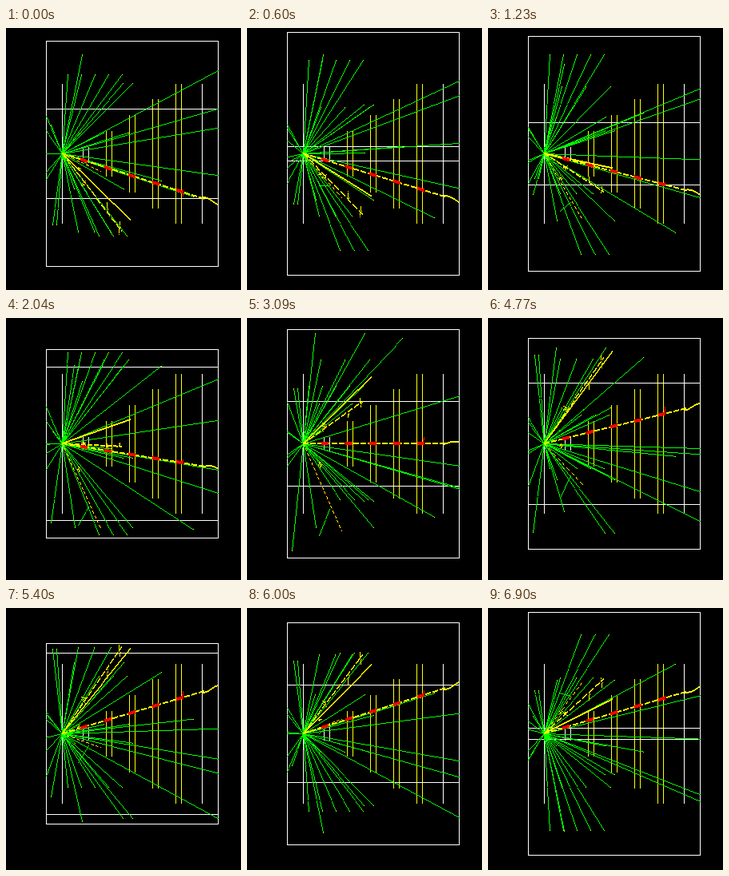
Animation, 294 px wide and 328 px high, one loop 6930 ms. Source, as a matplotlib script:

```python
import numpy as np
import matplotlib.pyplot as plt
from matplotlib.animation import FuncAnimation

W, H, DPI = 294, 328, 100
X0, CY = 70, 157
LEFT, RIGHT, BOX_R = 50, 265, 152
FRAMES, STEP = 231, np.radians(0.963)
HOLD = 12.55  # every so often the turn pauses for one frame
WHITE, GREEN, YELLOW, RED = (255,) * 3, (0, 255, 0), (255, 255, 0), (255, 0, 0)


def polar(r, deg):
    """Position across the beam as a complex number."""
    return r * np.exp(1j * np.radians(deg))


# Sprays of tracks: direction, radius, first x, last x, count
SPRAYS = [(53, 124, 77, 145, 5), (-53, 111, 58, 63, 2), (-64, 109, 90, 131, 3),
          (-125, 126, 116, 151, 3), (128.5, 112, 146, 158, 2),
          (-18, 144, 85, 147, 2), (14, 109, 92, 153, 3), (-166, 109, 86, 158, 2)]
# Single tracks: end x, radius, direction
SINGLES = [(56, 138, 165), (95, 126, 81), (194, 135, -14.5), (234, 107.5, -150),
           (265, 107, 103.5), (265, 83, 42.6), (265, 64.5, 150), (265, 62, -154)]

rng = np.random.default_rng(4)
tracks = [(x, polar(r, deg)) for deg, r, a, b, n in SPRAYS
          for x in np.linspace(a, b, n)]
tracks += [(x, polar(r, deg)) for x, r, deg in SINGLES]
tracks += [(LEFT, polar(rng.uniform(10, 55), deg)) for deg in range(0, 360, 60)]


def ray(x, r, deg):
    return np.array([X0, x]), np.array([0, polar(r, deg)])


def squiggle(x, r, deg, n=6):
    """A short ragged path around one point."""
    noise = rng.normal(0, 1.5, (3, n))
    return x + noise[0], polar(r, deg) * np.linspace(.9, 1.06, n) + noise[1] + 1j * noise[2]


kink = np.array([103, 90]), np.array([polar(84, -170), polar(115, -178)])
jet = ray(155, 116, -45.7)
shower = ray(144, 109, -62.7)
curl = ray(118, 112, -168.7)
muon = ray(248, 57, -91)
tail_x = np.arange(246, 266, 3)
tail = tail_x, polar(62.5, -91) * (tail_x - X0) / 195 + 2 * np.exp(1.9j * tail_x)
scraps = [squiggle(91, 32, -146), squiggle(97, 45, -60), squiggle(127, 76, -63),
          squiggle(141, 107, -62)]
muon_slope = polar(62.5, -91) / 195


def stroke(img, xs, ys, color, width=1, dash=(1, 0)):
    """Hard-edged polyline; dash is (on, off) in pixels."""
    on, off = dash
    for xa, ya, xb, yb in zip(xs[:-1], ys[:-1], xs[1:], ys[1:]):
        n = int(max(abs(xb - xa), abs(yb - ya))) + 1
        keep = np.arange(n) % (on + off) < on
        px = np.rint(np.linspace(xa, xb, n)).astype(int)[keep]
        py = np.rint(np.linspace(ya, yb, n)).astype(int)[keep]
        for k in range(width):
            img[py + k - width // 2, px] = color


# Fixed parts: the detector discs, seen from the side
base = np.zeros((H, W, 3), np.uint8)
for x in (70, 245):
    base[CY - 87:CY + 88, x] = WHITE
for k in range(5):
    r = min(8 + 20 * k, 87)
    for x in (96 + 29 * k, 103 + 29 * k):
        base[CY - r:CY + r + 1, x] = YELLOW if k else WHITE

fig = plt.figure(figsize=(W / DPI, H / DPI), dpi=DPI, facecolor="black")
ax = fig.add_axes([0, 0, 1, 1])
ax.axis("off")
view = ax.imshow(base, interpolation="nearest", aspect="auto")


def draw(i):
    a = (i - int(i / HOLD)) * STEP
    turn = np.exp(1j * a)
    img = base.copy()

    def path(xs, zs, color, **kw):
        stroke(img, xs, CY - (zs * turn).imag, color, **kw)

    corners = polar(BOX_R, 68.3 + 90 * np.arange(4)) * turn
    ys = np.rint(CY - corners.imag).astype(int)
    img[ys, LEFT:RIGHT + 1] = WHITE
    for x in (LEFT, RIGHT):
        img[ys.min():ys.max() + 1, x] = WHITE

    for x, z in tracks:
        path(np.array([X0, x]), np.array([0, z]), GREEN)
        if LEFT < x < RIGHT:
            path(np.array([x, x]), np.array([z, z]), YELLOW)
    path(*kink, GREEN)

    path(*curl, YELLOW, dash=(4, 2))
    path(*curl, RED, dash=(1, 8))
    path(*jet, YELLOW, width=2)
    path(*shower, YELLOW, width=2, dash=(6, 2))
    path(*muon, YELLOW, width=2, dash=(7, 2))
    path(*tail, YELLOW, width=2)
    for s in scraps:
        path(*s, YELLOW)

    for x in np.linspace(97, 217, 5):
        span = np.array([x - 4, x + 4])
        path(span, muon_slope * (span - X0), RED, width=4)
    path(np.array([220, 221]), np.array([-46j, 6 - 53j]), RED, width=2)

    view.set_data(img)
    return [view]


anim = FuncAnimation(fig, draw, frames=FRAMES, interval=30, repeat=True,
                     repeat_delay=0, init_func=lambda: draw(0))
plt.show()
```
